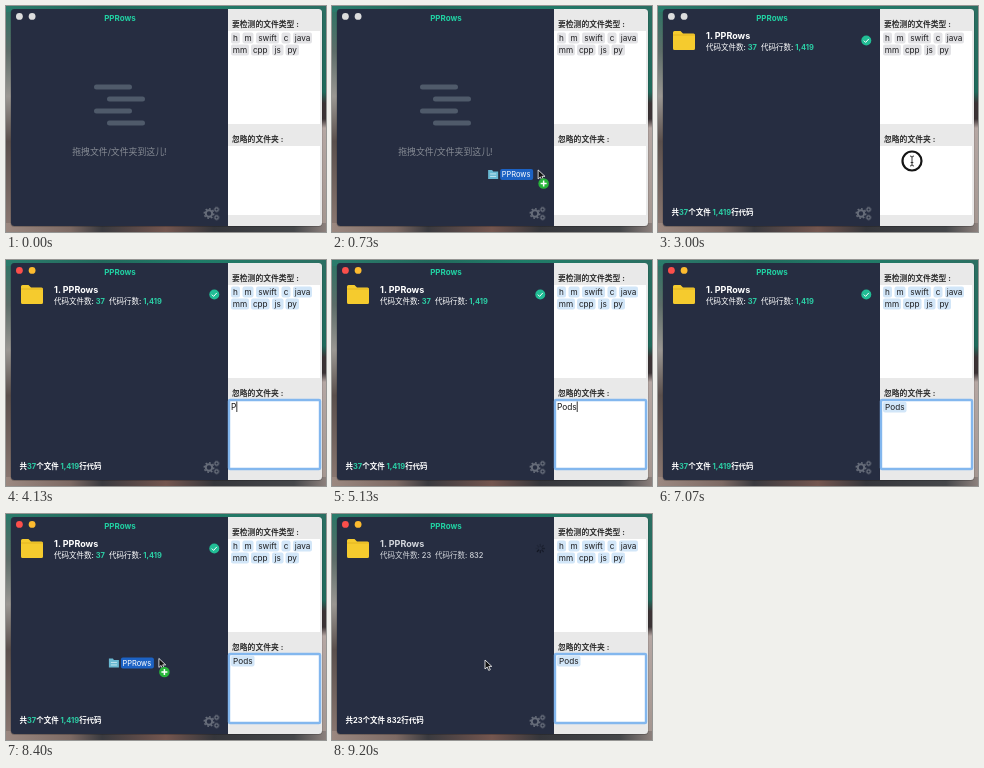
Write an HTML page that moves like this. It is 320 px wide and 226 px high and loops after 9.27 s.

```html
<!DOCTYPE html>
<html lang="zh-CN">
<head>
<meta charset="utf-8">
<title>PPRows</title>
<style>
html, body { margin: 0; height: 100%; overflow: hidden; background: #34403f; }
svg { display: block; width: 100vw; height: 100vh; }
text { font-family: Inter, "Noto Sans CJK SC", sans-serif; white-space: pre; }
.head { font-size: 7.8px; font-weight: 700; fill: #303030; }
.token { font-size: 8.2px; fill: #1c1c1e; text-anchor: middle; }
.pill { fill: #e3e3e6; }
.active .pill { fill: #d2e6f8; }
.light { fill: #dcdddd; }
.active .red { fill: #fc4f4b; }
.active .amber { fill: #fdbb2f; }
.done .num { fill: #2ccfa6; font-weight: 700; }
#list { fill: #d3d6dc; }
#list.done { fill: #fff; }
</style>
</head>
<body>
<svg viewBox="0 0 320 226" preserveAspectRatio="none">
  <defs>
    <linearGradient id="top">
      <stop offset="0" stop-color="#2b7c6c"/><stop offset=".3" stop-color="#23695c"/>
      <stop offset=".6" stop-color="#1f7c68"/><stop offset="1" stop-color="#2b6f62"/>
    </linearGradient>
    <linearGradient id="left" x2="0" y2="1">
      <stop offset="0" stop-color="#2b7565"/><stop offset=".2" stop-color="#5d6d69"/>
      <stop offset=".4" stop-color="#9a9793"/><stop offset=".6" stop-color="#5b504d"/>
      <stop offset="1" stop-color="#8d7a73"/>
    </linearGradient>
    <linearGradient id="right" x2="0" y2="1">
      <stop offset="0" stop-color="#2b6f62"/><stop offset=".38" stop-color="#1f6a5b"/>
      <stop offset=".43" stop-color="#3b3335"/><stop offset=".5" stop-color="#3b3335"/>
      <stop offset=".54" stop-color="#b5a7a3"/><stop offset="1" stop-color="#a3958f"/>
    </linearGradient>
    <linearGradient id="bottom">
      <stop offset="0" stop-color="#9b8880"/><stop offset=".2" stop-color="#7d6a64"/>
      <stop offset=".3" stop-color="#3a3a3f"/><stop offset=".5" stop-color="#74564f"/>
      <stop offset=".65" stop-color="#35363b"/><stop offset=".9" stop-color="#45474a"/>
      <stop offset="1" stop-color="#8d817d"/>
    </linearGradient>
    <clipPath id="frame"><rect x="5" y="3" width="311" height="217" rx="3.5"/></clipPath>
  </defs>

  <rect width="160" height="226" fill="url(#left)"/>
  <rect x="160" width="160" height="226" fill="url(#right)"/>
  <rect width="320" height="6" fill="url(#top)"/>
  <rect y="217" width="320" height="9" fill="url(#bottom)"/>
  <rect x="4.5" y="3" width="312" height="218" rx="4" opacity=".2"/>

  <g id="win">
    <g clip-path="url(#frame)">
      <rect x="5" y="3" width="217" height="217" fill="#262d41"/>
      <rect x="222" y="3" width="94" height="217" fill="#e9e9e9"/>
      <rect x="222" y="25" width="92" height="93" fill="#fff"/>
      <rect x="222" y="140" width="92" height="69" fill="#fff"/>
    </g>
    <circle class="light red" cx="13.4" cy="10.4" r="3.4"/>
    <circle class="light amber" cx="26.1" cy="10.4" r="3.4"/>
    <text x="114" y="15.4" font-size="8" font-weight="700" fill="#21d0a2" text-anchor="middle">PPRows</text>
    <g id="gears" fill="none" stroke="#666c79"></g>
    <text class="head" x="226" y="21">要检测的文件类型 :</text>
    <text class="head" x="226" y="136">忽略的文件夹 :</text>
    <g id="types"></g>
    <rect id="focus" x="223" y="140" width="91" height="69" rx="1" fill="none" stroke="#83b7ee" stroke-width="2.4"/>
    <g id="pods"></g>
    <text id="typed" x="225" y="149.5" font-size="8.3" fill="#111"></text>
    <path id="caret" stroke="#000" stroke-width=".8"/>
  </g>

  <g id="prompt">
    <path d="M90.5 81h33M103.5 93h33M90.5 105h33M103.5 117h33" stroke="#4f5a6a" stroke-width="5" stroke-linecap="round"/>
    <text x="113.4" y="148.5" font-size="8.9" fill="#858a93" text-anchor="middle">拖拽文件/文件夹到这儿!</text>
  </g>

  <g id="list">
    <path d="M15 26.5q0-1.500 1.500-1.500h6l2.500 2.500h10.500q1.500 0 1.500 1.500v13.500q0 1.500-1.500 1.500h-19q-1.500 0-1.500-1.500z" fill="#f5cb2e"/>
    <path d="M15 29h22" stroke="#dcae20" stroke-width=".8"/>
    <text x="48" y="33" font-size="9" font-weight="700">1. PPRows</text>
    <text x="48" y="44" font-size="7.5" font-weight="500">代码文件数: <tspan class="num" id="files"></tspan>  代码行数: <tspan class="num" id="lines"></tspan></text>
    <text x="13.5" y="209" font-size="7.5" font-weight="700" fill="#fff">共<tspan class="num" id="allFiles"></tspan>个文件 <tspan class="num" id="allLines"></tspan>行代码</text>
    <g id="check">
      <circle cx="208.3" cy="34.5" r="5" fill="#21bd95"/>
      <path d="M205.8 34.6l1.8 1.8 3.2-3.5" fill="none" stroke="#fff"/>
    </g>
    <g id="spinner" stroke="#10141f" stroke-width="1.3" stroke-linecap="round"></g>
  </g>

  <g id="mouse">
    <g id="ghost">
      <path d="M-50 0h4l1 1.5h5v7.5h-10z" fill="#69b9d2"/>
      <path d="M-48 4h6M-48 6.5h6" stroke="#d9f0f5" stroke-width=".8"/>
      <rect x="-38" y="-1" width="33" height="11" rx="2" fill="#1c62c4"/>
      <text x="-36.5" y="7.3" font-size="7.5" fill="#fff">PPRows</text>
    </g>
    <path id="arrow" d="M0 0v9l2.200-2 1.500 3.400 1.600-.7-1.500-3.300h3z" fill="#111" stroke="#fff" stroke-width=".8"/>
    <g id="badge">
      <circle cx="5.5" cy="13.5" r="5.3" fill="#27b53a"/>
      <path d="M2.500 13.500h6M5.500 10.500v6" stroke="#fff" stroke-width="1.5"/>
    </g>
    <circle id="press" r="9.5" fill="#fff" stroke="#151515" stroke-width="2.2"/>
    <path id="beam" d="M-2-5q2 0 2 1.500v7q0 1.500-2 1.500M2-5q-2 0-2 1.500M2 5q-2 0-2-1.500M-1.300 1.500h2.600" fill="none" stroke="#222" stroke-width=".9"/>
  </g>
</svg>
<script>
const LOOP = 9270, DROP1 = 1560, DROP2 = 8660, FOCUS = 3070, ENTER = 5950;
const PER_FILE = 23.6;
const KEYS = [3900, 4200, 4450, 4700];
// pointer stops: time, x, y
const PATH = [
  [200, 300, 245], [900, 190, 150], [1400, 167.5, 132], [2400, 167.5, 132],
  [2880, 254, 155], [6270, 254, 155], [6700, 300, 245], [7150, 300, 245],
  [7600, 150, 100], [8500, 153, 146]
];
const $ = id => document.getElementById(id);
const show = (id, on) => { $(id).style.display = on ? '' : 'none'; };
const comma = n => n.toLocaleString('en-US');

const token = (label, x, y, w) =>
  `<rect class="pill" x="${x}" y="${y}" width="${w}" height="11" rx="2"/>` +
  `<text class="token" x="${x + w / 2}" y="${y + 8.3}">${label}</text>`;

$('types').innerHTML = [
  ['h', 225, 26.5, 9], ['m', 236.5, 26.5, 11], ['swift', 250, 26.5, 23],
  ['c', 275.5, 26.5, 9], ['java', 287, 26.5, 19], ['mm', 225, 38.5, 18],
  ['cpp', 245, 38.5, 18.5], ['js', 266, 38.5, 11.5], ['py', 279.5, 38.5, 13.5]
].map(a => token(...a)).join('');
$('pods').innerHTML = token('Pods', 225, 141.5, 23.5);

const gear = (x, y, r, w) =>
  `<circle cx="${x}" cy="${y}" r="${r}" stroke-width="${w}"/>` +
  `<circle cx="${x}" cy="${y}" r="${r + w * .75}" stroke-width="${w * .8}" pathLength="16" stroke-dasharray="1"/>`;
$('gears').innerHTML = gear(203, 207.5, 3.2, 2) + gear(210.6, 203.5, 1.6, 1.2) + gear(210.6, 211.5, 1.6, 1.2);

$('spinner').innerHTML = Array.from({ length: 8 }, (_, i) =>
  `<path d="M0-2.2v-2" transform="rotate(${i * 45})" opacity="${.15 + i * .1}"/>`).join('');

function pointer(t) {
  const i = PATH.findIndex(p => p[0] > t);
  if (i === 0) return PATH[0].slice(1);
  if (i < 0) return PATH[PATH.length - 1].slice(1);
  const [t0, x0, y0] = PATH[i - 1], [t1, x1, y1] = PATH[i];
  const u = (t - t0) / (t1 - t0), k = u * u * (3 - 2 * u);
  return [x0 + (x1 - x0) * k, y0 + (y1 - y0) * k];
}

function drawList(t) {
  const again = t >= DROP2;
  const scanned = Math.ceil((t - (again ? DROP2 : DROP1 + PER_FILE)) / PER_FILE);
  const n = Math.max(1, Math.min(37, scanned));
  const lines = Math.round(again ? 832 * n / 23 : 70 + 1349 * (n - 1) / 36);
  const done = !again && n === 37;
  show('prompt', t < DROP1);
  show('list', t >= DROP1);
  show('check', done);
  show('spinner', !done);
  $('list').classList.toggle('done', done);
  $('files').textContent = $('allFiles').textContent = n;
  $('lines').textContent = comma(lines);
  $('allLines').textContent = comma(lines + (n === 1 ? 1 : 0));
  $('spinner').setAttribute('transform', `translate(208.3 34.5) rotate(${Math.floor(t / 90) * 45})`);
}

function drawField(t) {
  const count = KEYS.filter(k => t >= k).length, typing = t >= FOCUS && t < ENTER;
  $('win').classList.toggle('active', t >= FOCUS);
  show('focus', t >= FOCUS);
  show('pods', t >= ENTER);
  $('typed').textContent = typing ? 'Pods'.slice(0, count) : '';
  const x = 225.5 + (count ? $('typed').getComputedTextLength() : 0);
  $('caret').setAttribute('d', `M${x} 141.5v10.5`);
  show('caret', typing && Math.floor(t / 530) % 2);
}

function drawMouse(t) {
  const [x, y] = pointer(t);
  const drag = t < DROP1 || (t > 7000 && t < DROP2);
  const beam = !drag && x > 222 && y > 140 && y < 209;
  $('mouse').setAttribute('transform', `translate(${x} ${y})`);
  show('mouse', t < KEYS[0] || t >= 6270);
  show('ghost', drag);
  show('badge', drag && x < 222);
  show('arrow', !beam);
  show('beam', beam);
  show('press', t >= 2900 && t < 3200);
}

function tick(now) {
  const t = now % LOOP;
  drawList(t);
  drawField(t);
  drawMouse(t);
  requestAnimationFrame(tick);
}
tick(0);
</script>
</body>
</html>
```
